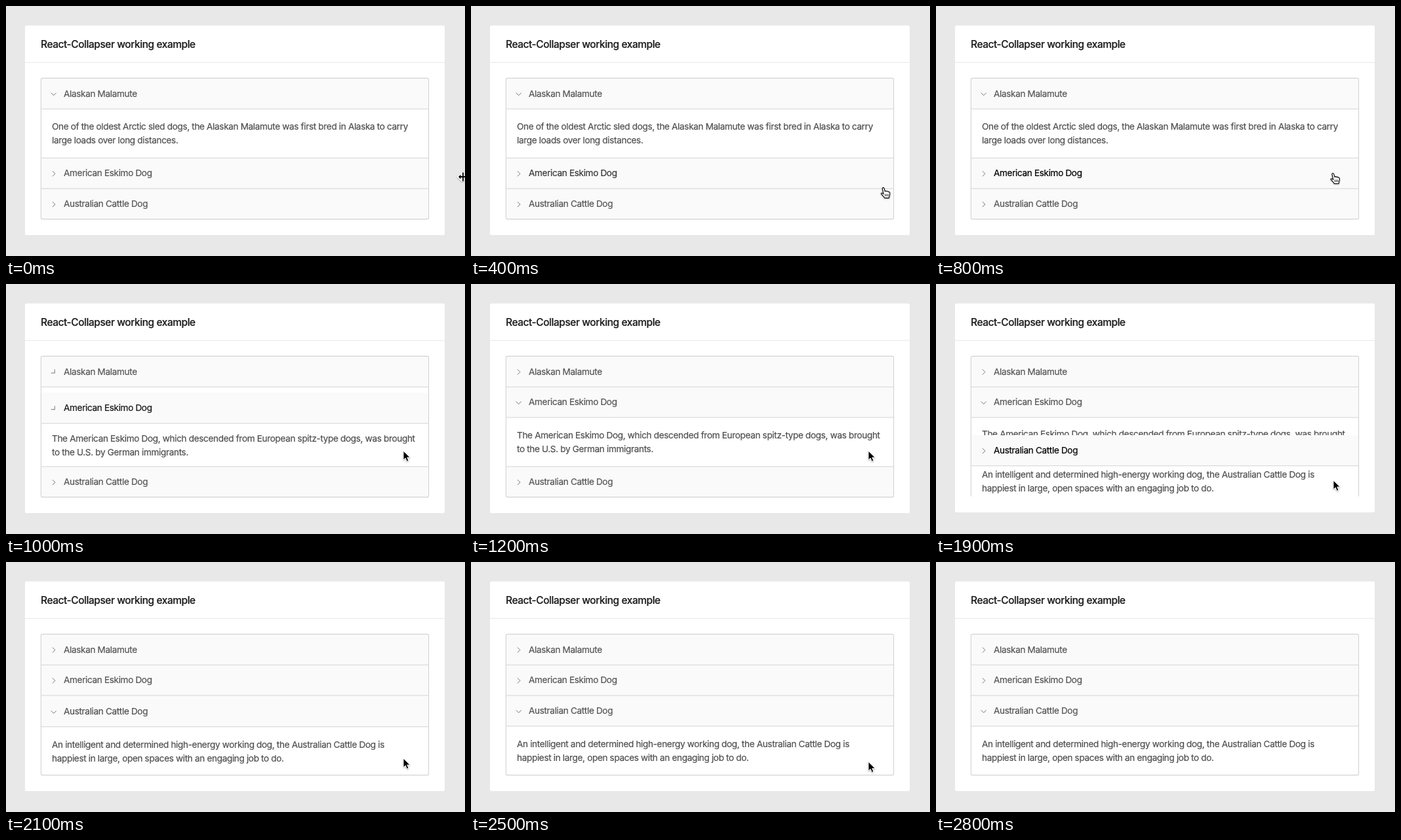
Animation of 700x382 px, one loop 2900 ms. Source, as an HTML page:

```html
<!DOCTYPE html>
<html lang="en">
<head>
<meta charset="utf-8">
<title>Accordion demo</title>
<style>
html, body { margin: 0; width: 100%; height: 100%; overflow: hidden; background: #e8e8e8; }
#stage { display: block; width: 700px; height: 382px; }
text {
  font: 400 13.6px Inter, "Open Sans", sans-serif; letter-spacing: -0.358px;
  color: #505050; fill: currentColor; stroke: currentColor; stroke-width: .22px;
}
.title { font-size: 15.5px; font-weight: 500; letter-spacing: -0.455px; color: #1e1e1e; }
.line { fill: none; stroke: #d3d3d3; stroke-width: 1.1; }
.chevron { fill: none; stroke: #777; stroke-width: 1; }
.cursor { filter: drop-shadow(0 1px 1px rgba(0, 0, 0, .3)); }
</style>
</head>
<body>
<svg id="stage" viewBox="0 0 700 382"></svg>
<script>
const LOOP = 2900, STEP = 100;
const TOP = 110.4, HEAD = 46.8, BODY = 75;
const LEFT = 53.4, RIGHT = 644.6;
const CLICKS = [817, 1792];
const HOVERS = [300, 1400];

const PANELS = [
  ["Alaskan Malamute",
    "One of the oldest Arctic sled dogs, the Alaskan Malamute was first bred in Alaska to carry",
    "large loads over long distances."],
  ["American Eskimo Dog",
    "The American Eskimo Dog, which descended from European spitz-type dogs, was brought",
    "to the U.S. by German immigrants."],
  ["Australian Cattle Dog",
    "An intelligent and determined high-energy working dog, the Australian Cattle Dog is",
    "happiest in large, open spaces with an engaging job to do."]
];

const stage = document.getElementById("stage");
const clamp = v => Math.max(0, Math.min(1, v));
const smooth = v => (v = clamp(v), v * v * (3 - 2 * v));

function set(node, attrs) {
  for (const key in attrs) node.setAttribute(key, attrs[key]);
  return node;
}

function add(parent, tag, attrs, text) {
  const node = set(document.createElementNS("http://www.w3.org/2000/svg", tag), attrs);
  if (text) node.textContent = text;
  return parent.appendChild(node);
}

const card = add(stage, "rect", { x: 29, y: 29.7, width: 640, rx: 2, fill: "#fff" });
add(stage, "path", { d: "M29 86.3H669", class: "line", style: "stroke:#e6e6e6" });
add(stage, "text", { x: 53, y: 63.6, class: "title" }, "React-Collapser working example");

const panels = PANELS.map(([name, ...lines], i) => {
  const head = add(stage, "g", {});
  add(head, "rect", {
    x: LEFT, width: RIGHT - LEFT, height: HEAD, rx: i ? 0 : 3, fill: "#fafafa"
  });
  const label = add(head, "text", { x: 88, y: 28.3 }, name);
  const chevron = add(head, "path", { d: "M-1.8 -4L2.2 0L-1.8 4", class: "chevron" });
  const rule = add(head, "path", { d: `M${LEFT} 0H${RIGHT}`, class: "line" });
  const body = add(stage, "svg", { x: 0, width: 700, overflow: "hidden" });
  const copy = add(body, "g", {});
  lines.forEach((line, n) => add(copy, "text", { x: 70, y: 32.3 + n * 21 }, line));
  const base = add(stage, "path", { d: `M${LEFT} 0H${RIGHT}`, class: "line" });
  return { head, label, chevron, rule, body, copy, base };
});
const frame = add(stage, "path", { class: "line" });

function makeCursor(draw) {
  const group = add(stage, "g", { class: "cursor" });
  draw(group);
  return group;
}

const cursors = {
  arrow: makeCursor(g => add(g, "path", {
    d: "M0 0V14L3.2 11L5.4 16.2L8 15.1L5.8 10.1H10.3Z",
    fill: "#000", stroke: "#fff", "stroke-width": 1, "stroke-linejoin": "round"
  })),
  hand: makeCursor(g => {
    const hand = add(g, "g", { transform: "translate(-1.2 1)" });
    add(hand, "path", {
      d: "M-.8 1.2C-1.2 -.7 1.2 -1.2 1.8 .6L3.2 5.4C3.6 4.2 5.6 4.4 5.9 5.6" +
        "C6.4 4.7 8 5 8.3 6.2C9 5.5 10.3 6 10.5 7.2C10.9 9.3 11 11 9.8 13L9.4 15.5H2.6" +
        "C2 13.6 -.4 11.6 -2.2 9.6C-3.4 8.2 -1.9 7.2 -.6 8.3L1 9.4Z",
      fill: "#fff", stroke: "#000", "stroke-width": 1.1, "stroke-linejoin": "round"
    });
    add(hand, "path", {
      d: "M3.6 9.5V12.8M5.8 9.5V12.8M8 9.5V12.8", stroke: "#000", "stroke-width": .9
    });
  }),
  resize: makeCursor(g => {
    const d = "M0 -6.5V6.5M-5.5 0H6";
    const heads = "M-7 0L-3.6 -3.4V3.4ZM8 0L4.6 -3.4V3.4Z";
    add(g, "path", { d: d + heads, fill: "#fff", stroke: "#fff", "stroke-width": 3.4 });
    add(g, "path", { d, stroke: "#000", "stroke-width": 1.8 });
    add(g, "path", { d: heads, fill: "#000" });
  })
};

// Critically damped spring from 0 to 1 that snaps when nearly at rest
function spring(ms) {
  const x = Math.max(0, ms) / 50;
  const p = 1 - (1 + x) * Math.exp(-x);
  return p > .99 ? 1 : p;
}

const turn = ms => 90 * clamp((ms - 133) / 100);

function pointer(t) {
  if (t < 100) return ["resize", 697, 261];
  if (t < 1400) {
    const s = smooth(t / 600);
    const kind = t >= 400 && t < 900 ? "hand" : "arrow";
    return [kind, 696 - 90 * s, 261 - 6 * s + 28 * Math.sin(Math.PI * s)];
  }
  if (t < 2500) {
    const kind = t >= 1500 && t < 1900 ? "hand" : "arrow";
    return [kind, 606, 255 + 45 * smooth((t - 1330) / 290)];
  }
  return [t < 2800 ? "arrow" : "", 606, 300 + 5.3 * ((t - 2400) / 100) ** 2];
}

function render(time) {
  const t = Math.floor((time % LOOP) / STEP) * STEP;
  const stageNo = t < 1400 ? 0 : 1;
  const since = t - CLICKS[stageNo];
  const p = spring(since);
  const closing = stageNo, opening = stageNo + 1;
  const heights = [0, 0, 0];
  heights[closing] = Math.floor(BODY * (1 - p) + .2);
  heights[opening] = Math.floor(BODY * p + .2);
  const total = heights[closing] + heights[opening];
  const moving = heights[closing] > 0 && heights[closing] < BODY;

  let y = TOP;
  panels.forEach((panel, i) => {
    const h = heights[i];
    const angle = i === closing ? 90 - turn(since) : i === opening ? turn(since) : 0;
    const hover = i === opening
      ? clamp((t - HOVERS[stageNo]) / 300) * (1 - clamp((since - 130) / 190)) : 0;
    const grey = Math.round(86 * (1 - hover));
    const gap = BODY - h;
    set(panel.head, { transform: `translate(0 ${y})` });
    set(panel.chevron, { transform: `translate(72.7 24.1) rotate(${angle})` });
    panel.label.style.color = `rgb(${grey},${grey},${grey})`;
    set(panel.rule, { visibility: i === 0 || (i === opening && moving) ? "hidden" : "visible" });
    y += HEAD;
    set(panel.body, { y, height: h });
    set(panel.copy, { transform: `translate(0 ${-gap * (i === opening ? .5 : .04)})` });
    set(panel.base, { transform: `translate(0 ${y})`, visibility: h ? "visible" : "hidden" });
    y += h;
  });

  const end = TOP + 3 * HEAD + total - .2;
  const upper = `V${TOP + 2}Q${LEFT} ${TOP} ${LEFT + 2} ${TOP}H${RIGHT - 2}Q${RIGHT} ${TOP} ${RIGHT} ${TOP + 2}`;
  const d = total < BODY
    ? `M${LEFT} ${end}${upper}V${end}`
    : `M${LEFT} ${end - 2}${upper}V${end - 2}Q${RIGHT} ${end} ${RIGHT - 2} ${end}` +
      `H${LEFT + 2}Q${LEFT} ${end} ${LEFT} ${end - 2}`;
  set(frame, { d });
  set(card, { height: end + 24.4 - 29.7 });

  const [kind, cx, cy] = pointer(t);
  for (const name in cursors) {
    set(cursors[name], {
      transform: `translate(${cx} ${cy})`,
      visibility: name === kind ? "visible" : "hidden"
    });
  }
}

let start;
function tick(now) {
  if (start === undefined) start = now;
  render(now - start);
  requestAnimationFrame(tick);
}
render(0);
requestAnimationFrame(tick);
</script>
</body>
</html>
```
